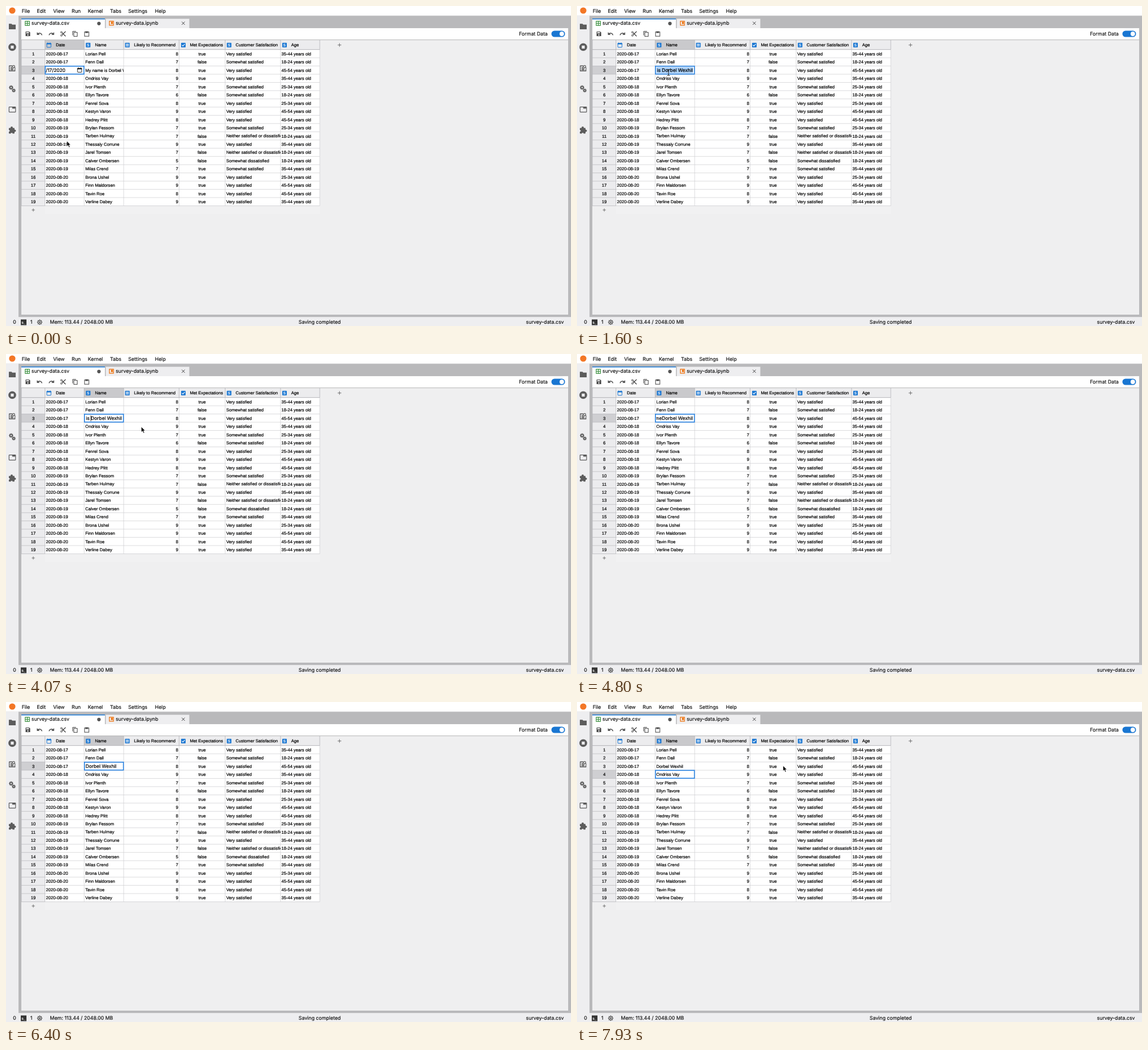
An HTML page for the animation above (8000 ms loop, 994 by 563 pixels).

```html
<!DOCTYPE html>
<html lang="en">
<head>
<meta charset="utf-8">
<title>Survey table</title>
<style>
html, body { margin: 0; width: 100%; height: 100%; overflow: hidden; background: #eeeef0; }
svg { display: block; }
text { font: 7.6px "Liberation Sans", Arial, sans-serif; fill: #000; stroke: #000; stroke-width: .2px; text-rendering: geometricPrecision; white-space: pre; }
.ui { font: 8.75px Inter, sans-serif; fill: #111; stroke: #111; stroke-width: .16px; }
.edit { font: 8.3px Inter, sans-serif; }
.badge { fill: #fff; stroke: none; font-size: 6.5px; font-weight: bold; }
.mid { text-anchor: middle; }
.end { text-anchor: end; }
</style>
</head>
<body>
<svg id="stage" width="994" height="563" viewBox="0 0 994 563"></svg>
<script>
const stage = document.getElementById('stage');
const BLUE = '#1976d2', FOCUS = '#2680e0', GRAY = '#5c5c5c', PANEL = '#eeeef0';
const TOP = 76.6, ROW = 14.47, BASE = 10.2;
const LEFT = 27, RIGHT = 989, BOTTOM = 543;
const cols = [LEFT, 68.5, 137.5, 207, 304.5, 385.5, 483, 552];
const rowY = i => TOP + ROW * i;

const rect = (x, y, w, h, fill, more = '') =>
  `<rect x="${x}" y="${y}" width="${w}" height="${h}" fill="${fill}" ${more}/>`;
const text = (x, y, s, cls = '', more = '') => `<text x="${x}" y="${y}" class="${cls}" ${more}>${s}</text>`;
const path = (d, stroke, w = 1, fill = 'none') =>
  `<path d="${d}" stroke="${stroke}" stroke-width="${w}" fill="${fill}"/>`;
const disc = (x, y, r, fill, more = '') => `<circle cx="${x}" cy="${y}" r="${r}" fill="${fill}" ${more}/>`;
const at = (x, y, body) => `<g transform="translate(${x} ${y})">${body}</g>`;
const clipped = (col, row, body) =>
  `<svg x="${cols[col]}" y="${rowY(row)}" width="${cols[col + 1] - cols[col]}" height="${ROW}">${body}</svg>`;

const NAME = 'Dorbel Wexhil', PREFIX = 'My name is ';
const names = ['Lorian Pell', 'Fenn Dall', NAME, 'Ondriss Vay', 'Ivor Plenth', 'Ellyn Tavore',
  'Fenrel Sova', 'Kestyn Varon', 'Hedrey Plitt', 'Brylan Fessom', 'Tarben Hulmay', 'Thessaly Corrune',
  'Jarel Tomsen', 'Calver Ombersen', 'Milas Crend', 'Brona Ushel', 'Finn Maldorsen', 'Tavin Roe', 'Verline Dabey'];
// One character per row.
const scores = '8789768987797579989';
const met = 'tftttftttttftffttttt'.slice(0, 0) + 'tftttfttttftfft' + 'tttt';
const moods = 'VSVVSSVVVSNVNDSVVVV';
const ages = '3143212442131132443';
const moodText = { V: 'Very satisfied', S: 'Somewhat satisfied', D: 'Somewhat dissatisfied', N: 'Neither satisfied or dissatisfied' };
const ageText = ['', '18-24', '25-34', '35-44', '45-54'];
const day = i => i < 3 ? 17 : i < 9 ? 18 : i < 15 ? 19 : 20;

function gear(r, hole) {
  let teeth = '';
  for (let a = 0; a < 360; a += 45)
    teeth += rect(-.8, -r - 1, 1.6, 2, GRAY, `transform="rotate(${a})"`);
  return teeth + disc(0, 0, r - hole / 2, 'none', `stroke="${GRAY}" stroke-width="${hole}"`);
}

function calendar(color) {
  return rect(-3.6, -3, 7.2, 7, 'none', `stroke="${color}" rx=".6"`) + rect(-4, -3.4, 8, 2.2, color) +
    path('M-2.2 -4.4v1.6M2.2 -4.4v1.6', color);
}

function typeIcon(kind) {
  if (kind === 'date') return calendar(BLUE);
  const box = rect(-4, -4, 8, 8, BLUE, 'rx=".8"');
  if (kind === 'num') return box + path('M-1.2 -2.8v5.6M1.2 -2.8v5.6M-2.8 -1.2h5.6M-2.8 1.2h5.6', '#fff', .8);
  if (kind === 'bool') return box + path('M-2.5 0L-.8 1.8L2.6 -1.8', '#fff', 1.1);
  return box + text(0, 2.4, 'S', 'badge mid');
}

function sidebar() {
  return rect(0, 17, 22, 530, PANEL) +
    path('M5 31.2h4.6l1.4 1.5h6v8.2H5z', 'none', 0, GRAY) +
    disc(11, 72.3, 6.8, GRAY) + rect(8.4, 69.7, 5.2, 5.2, PANEL) +
    at(11, 109, path('M-5.2 -3.8H0M-5.2 -4.2V5.2H4.6V1.5M-3 -1H0M-3 1.2H2M-3 3.2H2', GRAY, 1.4) +
      disc(2.4, -2.4, 2, 'none', `stroke="${GRAY}" stroke-width="1.2"`) + path('M3.8 -1L5.6 .9', GRAY, 1.2)) +
    at(9, 143.4, gear(2.8, 1.6)) + at(13.6, 148.6, gear(2.2, 1.3)) +
    rect(5.4, 177.6, 11.4, 9, 'none', `stroke="${GRAY}" stroke-width="1.2" rx=".6"`) + rect(11, 177.5, 5.8, 3, GRAY) +
    rect(5, 214.6, 10, 10, GRAY, 'rx="1"') + disc(10, 214, 2, GRAY) + disc(15.4, 219.4, 2, GRAY) +
    disc(5, 219.6, 1.6, PANEL) + disc(10, 224.6, 1.6, PANEL);
}

function toolbar() {
  const ink = '#444';
  return rect(LEFT, 39, RIGHT - LEFT, 20.5, '#fff') + rect(LEFT, 59, RIGHT - LEFT, 1, '#b8b8b8') +
    at(38.5, 49, path('M-4 -4H2.4L4 -2.4V4H-4z', 'none', 0, ink) + rect(-2.8, -3, 4.6, 2.2, '#fff') + disc(0, 1.9, 1.2, '#fff')) +
    at(59, 49, path('M-4 -2.5V1H-.4M-3.6 .6C-1 -2.4 3.2 -1.6 4.3 2.4', ink, 1.3)) +
    at(80, 49, path('M4 -2.5V1H.4M3.6 .6C1 -2.4 -3.2 -1.6 -4.3 2.4', ink, 1.3)) +
    at(100.5, 49, path('M-2 -2L4.4 4.2M-2 2L4.4 -4.2', ink, 1.3) +
      disc(-3, -2.8, 1.4, 'none', `stroke="${ink}"`) + disc(-3, 2.8, 1.4, 'none', `stroke="${ink}"`)) +
    at(121.5, 49, path('M-4.2 2.6V-4.4H1.6', ink) + rect(-2.2, -2.6, 6, 7, 'none', `stroke="${ink}"`)) +
    at(142, 49, rect(-3.8, -3.4, 7.6, 7.6, 'none', `stroke="${ink}"`) + rect(-2.4, -4.4, 4.8, 2.8, ink)) +
    text(902.5, 52.2, 'Format Data', 'ui') +
    rect(959.5, 43.5, 24, 11, BLUE, 'rx="5.5"') + disc(977.8, 49, 3.9, '#fff');
}

function shell() {
  const menu = [['File', 27.7], ['Edit', 54.3], ['View', 83], ['Run', 115.5], ['Kernel', 144], ['Tabs', 183], ['Settings', 215], ['Help', 262]];
  return rect(0, 0, 994, 563, PANEL) + rect(0, 0, 994, 17, '#fff') + disc(11, 8, 5.6, '#f37726') +
    menu.map(([s, x]) => text(x, 11.5, s, 'ui')).join('') +
    rect(0, 16.8, 994, .8, '#c4c4c4') + rect(22, 17.5, 972, 530, '#b9b9bb') + sidebar() +
    rect(LEFT, 22, 147, 17.5, '#fff') + rect(LEFT, 22, 147, 1.5, BLUE) +
    rect(175.5, 22.5, 147, 16.5, PANEL) +
    at(37.5, 30.5, rect(-3.7, -3.7, 7.4, 7.4, 'none', 'stroke="#388e3c" stroke-width="1.2"') + path('M0 -4V4M-4 0H4', '#388e3c', 1.2)) +
    text(44.8, 33.4, 'survey-data.csv', 'ui') + disc(163.5, 30.8, 3.1, '#555') +
    at(185.5, 30.3, rect(-3.6, -3.6, 7.2, 7.2, 'none', 'stroke="#ef6c00" stroke-width="1.2"') + rect(-.7, -2.6, 3, 4, '#ef6c00')) +
    text(193, 33.4, 'survey-data.ipynb', 'ui') + path('M309.2 27.6l5.4 5.4M314.6 27.6l-5.4 5.4', '#444', 1) +
    toolbar() + rect(LEFT, 60, RIGHT - LEFT, BOTTOM - 60, '#efeff0') +
    rect(0, 547.3, 994, 15.7, PANEL) +
    text(12.2, 559.4, '0', 'ui') + rect(26, 551.5, 10, 10, '#333') +
    text(27.2, 558.6, 's_', 'badge') + text(42.8, 559.4, '1', 'ui') +
    at(59.3, 556.3, gear(3.7, 1.2) + rect(-1.4, -1.4, 2.8, 2.8, GRAY)) +
    text(77.3, 559.4, 'Mem: 113.44 / 2048.00 MB', 'ui') + text(514.8, 559.4, 'Saving completed', 'ui') +
    text(981.5, 559.4, 'survey-data.csv', 'ui end');
}

function table() {
  const heads = [['Date', 'date', 75.5, 87.8], ['Name', 'str', 144.5, 156.5], ['Likely to Recommend', 'num', 213.5, 225.3],
    ['Met Expectations', 'bool', 312, 323.5], ['Customer Satisfaction', 'str', 392.5, 404], ['Age', 'str', 490, 501.8]];
  const bottom = rowY(19), side = cols[1] - LEFT;
  let out = rect(LEFT, 60, 552 - LEFT, 16.6, '#ececee') + rect(LEFT, TOP, side, bottom - TOP, '#ececee') +
    rect(68.5, TOP, 483.5, bottom - TOP, '#fff') + rect(68.5, bottom, 483.5, ROW, '#f1f1f2') +
    rect(68.5, 60, 69, 16.6, '#c9c9cc', 'id="headA"') + rect(137.5, 60, 69.5, 16.6, '#c9c9cc', 'id="headB"') +
    rect(LEFT, 0, side, ROW, '#cfcfd2', 'id="rowMark"');
  for (let i = 0; i <= 19; i++)
    out += path(`M68.5 ${rowY(i)}H552`, '#cccccf', .7) + path(`M${LEFT} ${rowY(i)}H68.5`, '#bcbcbf', .8);
  cols.forEach((x, i) => {
    out += path(`M${x} 60V${TOP}`, '#b4b4b8', .8) + path(`M${x} ${TOP}V${bottom}`, i < 2 ? '#b4b4b8' : '#cccccf', .7);
  });
  out += path(`M${LEFT} ${TOP}H552`, '#b4b4b8', .8);
  for (const [s, kind, ix, tx] of heads) out += at(ix, 68.7, typeIcon(kind)) + text(tx, 71.4, s);
  for (let i = 0; i < 19; i++) {
    const y = rowY(i) + BASE;
    out += text(48, y, i + 1, 'mid') + text(70.3, y, `2020-08-${day(i)}`, '', i === 2 ? 'id="date"' : '') +
      clipped(2, i, text(2, BASE, names[i], '', i === 2 ? 'id="name"' : '')) +
      text(303, y, scores[i], 'end') + text(345, y, met[i] === 't' ? 'true' : 'false', 'mid') +
      clipped(5, i, text(1.9, BASE, moodText[moods[i]])) + text(484.5, y, ageText[ages[i]] + ' years old');
  }
  return out + path('M45.3 358.9h5.4M48 356.2v5.4', '#555', .8) + path('M583.5 68.6h6.4M586.7 65.4v6.4', '#555', .8);
}

function overlay() {
  const y = rowY(2) + .3, outline = `stroke="${FOCUS}" stroke-width="1.6"`;
  return `<g id="dateEdit">${rect(69, y, 68.2, 13.9, '#fff', outline)}
    ${clipped(1, 2, text(1.4, 10.4, '/17/2020', 'edit'))}${at(129.5, 112.6, calendar('#222'))}</g>
    <g id="nameEdit">${rect(138, y, 68.6, 13.9, '#fff')}${rect(139.6, 107.4, 64.4, 11, '#a9cff7', 'id="picked"')}
    <svg x="139.5" y="105" width="65" height="16"><text id="input" y="11" class="edit"></text>
    ${rect(0, 3.2, .9, 10, '#111', 'id="caret"')}</svg></g>
    ${rect(138, 0, 68.6, 13.9, 'none', `id="frame" ${outline}`)}
    <g id="arrow">${path('M0 0V9.6L2.2 7.6L3.8 11.2L5.5 10.4L3.9 7H6.8Z', '#fff', .7, '#000')}</g>
    <g id="beam">${path('M-2.4 -5.6Q0 -5.6 0 -4V4Q0 5.6 -2.4 5.6M2.4 -5.6Q0 -5.6 0 -4M2.4 5.6Q0 5.6 0 4', '#222', 1)}</g>`;
}

stage.innerHTML = shell() + table() + overlay();
const el = id => document.getElementById(id);
const show = (id, on) => el(id).setAttribute('visibility', on ? 'visible' : 'hidden');
const input = el('input');
const width = s => { input.textContent = s; return input.getComputedTextLength(); };

const SELECT = 950, EDIT = 1130, UNPICK = 2200, ERASE = 4330, COMMIT = 6600;
// [start, end, x, y]: moves to x, y between start and end.
const moves = [[70, 1000, 161, 117], [1650, 2150, 150, 113], [3500, 3950, 238, 128], [7330, 7930, 362.5, 112]];

function pointer(t) {
  let x = 107, y = 237.5;
  for (const [a, b, tx, ty] of moves) {
    const k = Math.max(0, Math.min(1, (t - a) / (b - a)));
    const e = k * k * (3 - 2 * k);
    x += (tx - x) * e;
    y += (ty - y) * e;
  }
  return [x, y];
}

// Fills the input, scrolled to its end, and tells whether the caret is lit.
function editor(t) {
  const erased = t < ERASE ? 0 : Math.min(PREFIX.length, Math.floor((t - ERASE) / 125) + 1);
  const value = PREFIX.slice(0, PREFIX.length - erased) + NAME;
  const tail = width(NAME), full = width(value);
  const x = Math.min(.5, 64.2 - full);
  input.setAttribute('x', x);
  el('caret').setAttribute('x', Math.max(0, x + full - tail - .5));
  const blink = t < ERASE ? (t - UNPICK + 790) % 1060 < 600 : t >= 5930 && t < 6400;
  return t >= UNPICK && blink;
}

function draw(t) {
  const dating = t < SELECT, editing = t >= EDIT && t < COMMIT, row = t < COMMIT ? 2 : 3;
  show('dateEdit', dating);
  show('date', !dating);
  show('headA', dating);
  show('headB', !dating);
  show('frame', !dating);
  show('nameEdit', editing);
  show('picked', editing && t < UNPICK);
  show('caret', editor(t) && editing);
  show('name', !editing);
  el('name').textContent = t < COMMIT ? PREFIX + NAME : NAME;
  el('rowMark').setAttribute('y', rowY(row));
  el('frame').setAttribute('y', rowY(row) + .3);

  const [x, y] = pointer(t);
  const overInput = editing && x < 207 && y < 120;
  const hidden = t >= ERASE && t < 7330;
  show('arrow', !hidden && !overInput);
  show('beam', !hidden && overInput);
  for (const id of ['arrow', 'beam']) el(id).setAttribute('transform', `translate(${x} ${y})`);
}

function tick() {
  draw(performance.now() % 8000);
  requestAnimationFrame(tick);
}
tick();
</script>
</body>
</html>
```
